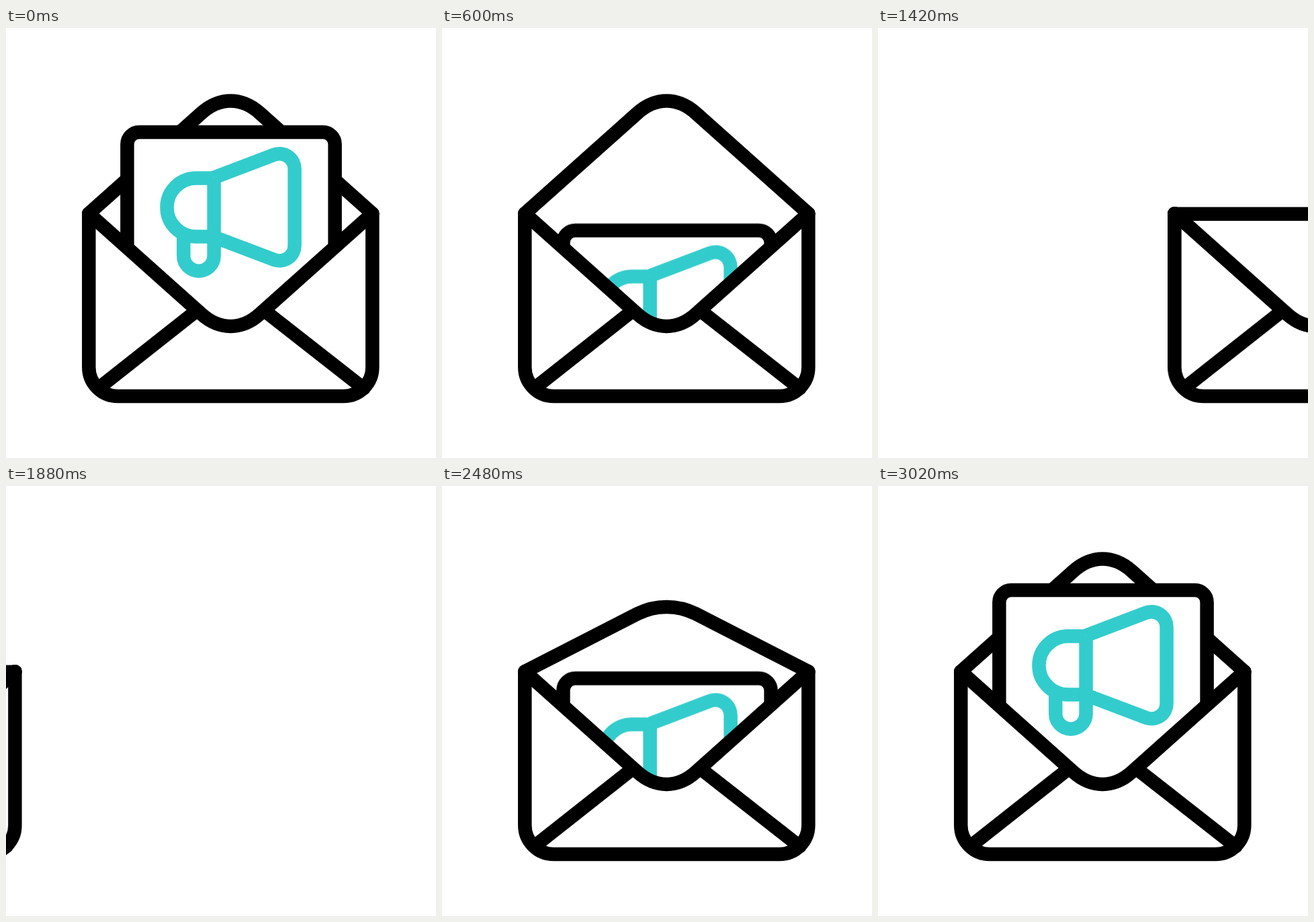
Write an HTML page that moves like this. It is 640x640 px and loops after 3220 ms.

```html
<!DOCTYPE html>
<html lang="en">
<head>
<meta charset="utf-8">
<title>Mail campaign</title>
<style>
  html, body { margin: 0; width: 100%; height: 100%; overflow: hidden; background: #fff; }
  svg { display: block; width: 100%; height: 100%; }

  :root {
    --up: path("M123.3 276.2 L291 126.5 C303.3 115.5 318.5 108.5 334.3 108.5 C350.1 108.5 365.3 115.5 377.6 126.5 L545.3 276.2");
    --down: path("M123.3 276.2 L291 425.9 C303.3 436.9 318.5 443.9 334.3 443.9 C350.1 443.9 365.3 436.9 377.6 425.9 L545.3 276.2");
    --ease: cubic-bezier(.3333, 0, .6667, 1);
  }

  .line { fill: none; stroke: #000; stroke-width: 20.5; stroke-linecap: round; stroke-linejoin: round; }
  .paper { fill: #fff; }
  .horn { stroke: #3cc; stroke-linecap: butt; }

  #mail, #letter, .flap { animation: 3220ms var(--ease) infinite; }
  #mail { animation-name: slide; }
  #letter { animation-name: drop; }
  .flap { d: var(--up); animation-name: fold; }
  #front { animation: cover 3220ms step-end infinite; }
  .pocket { d: var(--down); }

  /* 0-760 ms down, 2260-3020 ms up */
  @keyframes drop {
    0%, 93.7888%, 100% { transform: translateY(0); }
    23.6025%, 70.1863% { transform: translateY(165px); }
  }
  /* 600-1000 ms shut, 2200-2600 ms open */
  @keyframes fold {
    0%, 18.6335%, 80.7453%, 100% { d: var(--up); }
    31.0559%, 68.323% { d: var(--down); }
  }
  /* the flap is in front of the letter once it passes the fold */
  @keyframes cover {
    0%, 74.6894%, 100% { visibility: hidden; }
    24.6894% { visibility: visible; }
  }
  /* 1200-1600 ms out to the right, 1800-2200 ms in from the left */
  @keyframes slide {
    0%, 37.2671% { transform: translateX(0); }
    49.6894% { transform: translateX(550px); animation-timing-function: step-end; }
    55.925% { transform: translateX(-594px); }
    68.345%, 100% { transform: translateX(0); }
  }
</style>
</head>
<body>
<svg viewBox="0 0 640 640">
  <defs>
    <clipPath id="mouth">
      <path d="M123.3 0 V276.2 L291 425.9 C303.3 436.9 318.5 443.9 334.3 443.9 C350.1 443.9 365.3 436.9 377.6 425.9 L545.3 276.2 V0 Z"/>
    </clipPath>
  </defs>
  <g id="mail">
    <path class="line flap"/>

    <g clip-path="url(#mouth)">
      <g id="letter">
        <path class="line paper" d="M180.4 480 V173 A18 18 0 0 1 198.4 155 H471.6 A18 18 0 0 1 489.6 173 V480"/>
        <path class="line horn" d="M309.6 222.6 L399 188.7 A22.6 22.6 0 0 1 429.6 209.8 V323.8 A22.6 22.6 0 0 1 399 344.9 L309.6 311"/>
        <path class="line horn" d="M309.6 223.4 H283 A43.5 43.5 0 0 0 283 310.4 H309.6"/>
        <path class="line horn" d="M264.3 306 V339 A22.65 22.65 0 0 0 309.6 339 V223"/>
      </g>
    </g>

    <path class="line pocket"/>

    <g id="front">
      <path class="line paper flap"/>
      <path class="line" d="M123.3 276.7 H545.3"/>
    </g>

    <path class="line" d="M123.3 276.2 V505 A43 43 0 0 0 166.3 548 H502.3 A43 43 0 0 0 545.3 505 V276.2"/>
    <path class="line" d="M137.5 536.3 L281 423 M532.5 536.5 L387.6 423"/>
  </g>
</svg>
</body>
</html>
```
